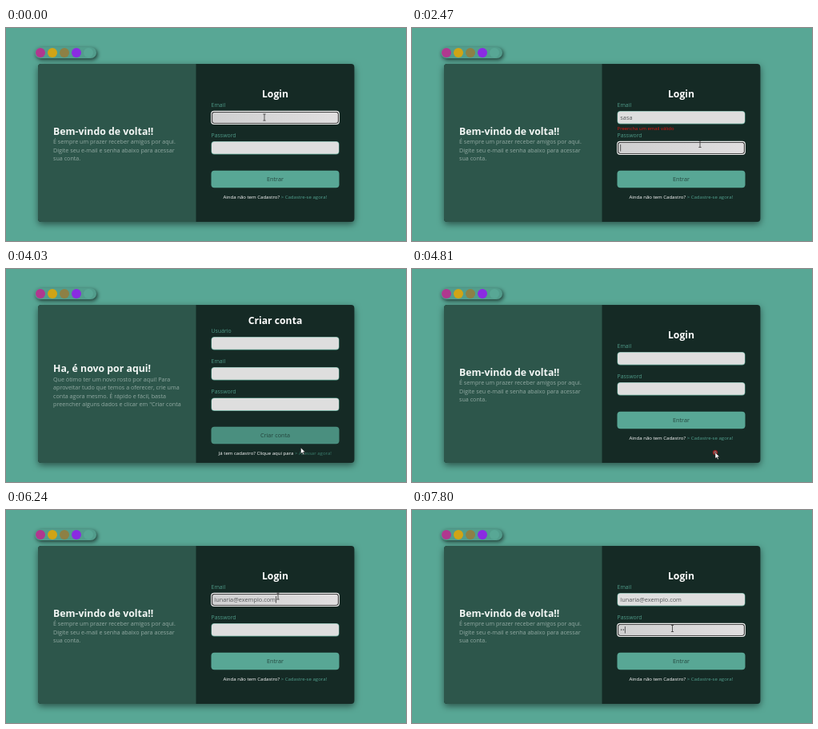
Animation of 500x267 px, one loop 8000 ms. Source, as an HTML page with a canvas:

```html
<!DOCTYPE html>
<html lang="pt-BR">
<head>
<meta charset="utf-8">
<title>Login</title>
<style>
html, body { margin: 0; width: 100%; height: 100%; overflow: hidden; background: #58a795; }
canvas { display: block; width: 500px; height: 267px; }
</style>
</head>
<body>
<canvas id="stage"></canvas>
<script>
const W = 500, H = 267, LOOP = 8000, STEP = 130, LAST = 60;
const GREEN = '#58a795', LEFT = '#2d564b', RIGHT = '#152a25', LABEL = '#4f9a88';
const FONT = '"Open Sans", "Noto Sans", sans-serif';
const MAIL = 'lunaria@exemplo.com';

const canvas = document.getElementById('stage');
const ctx = canvas.getContext('2d');
const dpr = window.devicePixelRatio || 1;
canvas.width = W * dpr;
canvas.height = H * dpr;

const clamp = v => Math.max(0, Math.min(1, v));
const ease = p => p * p * (3 - 2 * p);
const mix = (a, b, p) => a + (b - a) * p;

// Pointer stops: [arrival, x, y], with departure times between them
const moves = [
  { from: 0, to: 0, x: 323, y: 112 },
  { from: 620, to: 910, x: 378, y: 89 },
  { from: 1400, to: 1820, x: 360, y: 145.5 },
  { from: 2470, to: 2720, x: 370, y: 212 },
  { from: 3860, to: 4030, x: 368.5, y: 224 },
  { from: 4060, to: 4500, x: 379, y: 230 },
  { from: 5050, to: 5440, x: 340, y: 108 },
  { from: 6300, to: 6760, x: 325.5, y: 148.5 }
];
const clicks = [1110, 2060, 2680, 4790, 5430, 6840];

const PAGES = {
  login: {
    head: 'Login', headY: 87.4, title: 'Bem-vindo de volta!!', titleY: 134,
    lines: ['É sempre um prazer receber amigos por aqui.',
            'Digite seu e-mail e senha abaixo para acessar', 'sua conta.'],
    fields: [['Email', 104], ['Password', 142]],
    button: 'Entrar', buttonY: 178.8,
    ask: 'Ainda não tem Cadastro?', link: '> Cadastre-se agora!'
  },
  signup: {
    head: 'Criar conta', headY: 68.5, title: 'Ha, é novo por aqui!', titleY: 129.3,
    lines: ['Que ótimo ter um novo rosto por aqui! Para',
            'aproveitar tudo que temos a oferecer, crie uma',
            'conta agora mesmo. É rápido e fácil, basta',
            'preencher alguns dados e clicar em "Criar conta'],
    fields: [['Usuário', 85], ['Email', 123], ['Password', 161.4]],
    button: 'Criar conta', buttonY: 197.8,
    ask: 'Já tem cadastro? Clique aqui para', link: '> Acessar agora!'
  }
};

function text(str, x, y, size, color, weight = 400, align = 'left') {
  ctx.font = `${weight} ${size}px ${FONT}`;
  ctx.textAlign = align;
  ctx.fillStyle = color;
  ctx.fillText(str, x, y);
  return ctx.measureText(str).width;
}

function box(x, y, w, h, r, fill) {
  ctx.beginPath();
  ctx.roundRect(x, y, w, h, r);
  if (fill) {
    ctx.fillStyle = fill;
    ctx.fill();
  }
}

function disc(x, y, r, fill) {
  ctx.beginPath();
  ctx.arc(x, y, r, 0, 7);
  ctx.fillStyle = fill;
  ctx.fill();
}

function shadow(dx, dy, blur, alpha) {
  ctx.shadowOffsetX = dx * dpr;
  ctx.shadowOffsetY = dy * dpr;
  ctx.shadowBlur = blur * dpr;
  ctx.shadowColor = `rgba(0,0,0,${alpha})`;
}

function frame() {
  ctx.fillStyle = GREEN;
  ctx.fillRect(0, 0, W, H);

  ctx.save();
  shadow(1.5, 2, 5, .65);
  box(36, 24, 77, 14, 7, '#529d8c');
  ctx.restore();
  ['#b0388f', '#d0a416', '#8d8045', '#8a2be2', GREEN]
    .forEach((c, i) => disc(43 + 15 * i, 31, 6, c));

  ctx.save();
  shadow(0, 3, 8, .5);
  box(40, 45, 395.4, 198, 4, RIGHT);
  ctx.restore();
  box(40, 45, 197.5, 198, [4, 0, 0, 4], LEFT);
}

function field(label, y, value, focused, caret) {
  const x = 256.5, w = 160, h = 16.6;
  text(label, 256.6, y - 5, 6.9, LABEL);
  if (focused) {
    box(x - .4, y - .2, w + .8, h + .5, 4, '#f4f4f4');
    box(x + .7, y + .9, w - 1.4, h - 1.7, 3.2, '#141414');
    const g = ctx.createLinearGradient(x, y, x + w, y + h);
    g.addColorStop(0, '#cfcfd0');
    g.addColorStop(1, '#e1dfe0');
    box(x + 1.6, y + 1.8, w - 3.2, h - 3.5, 2.5, g);
  } else {
    box(x, y, w, h, 4, '#5aa693');
    box(x + .5, y + .6, w - 1, h - 1.4, 3.5, '#dedede');
  }
  const tw = text(value, 260.3, y + 10.9, 7.35, '#55585a');
  if (caret) {
    ctx.fillStyle = '#222';
    ctx.fillRect(260.4 + tw, y + 4, .7, 8.5);
  }
}

function drawPage(page, values, focus, caret, hover, linkHover) {
  frame();
  text(page.title, 59, page.titleY, 12.3, '#f3f7f5', 700);
  page.lines.forEach((s, i) => text(s, 59, page.titleY + 11.4 + 10.4 * i, 7.18, '#92aaa3'));
  text(page.head, 336.5, page.headY, 12.2, '#fff', 700, 'center');
  page.fields.forEach(([label, y], i) =>
    field(label, y, values[i] || '', focus === i, focus === i && caret));

  const c = [[88, 74], [167, 143], [149, 127]].map(([a, b]) => Math.round(mix(a, b, hover)));
  box(256.5, page.buttonY, 160, 21.4, 4, `rgb(${c})`);
  text(page.button, 336.5, page.buttonY + 13.2, 7.25, '#24443c', 400, 'center');

  ctx.font = `400 6.05px ${FONT}`;
  const full = ctx.measureText(page.ask + ' ' + page.link).width;
  const x = 336.3 - full / 2, y = page.buttonY + 35;
  const w = text(page.ask + ' ', x, y, 6.05, '#fff');
  text(page.link, x + w, y, 6.05, linkHover ? '#3b7e6e' : '#52a18f');
}

function pointer(t) {
  let { x, y } = moves[0];
  for (const m of moves) {
    if (t < m.from || !m.to) continue;
    const p = ease(clamp((t - m.from) / (m.to - m.from)));
    x = mix(x, m.x, p);
    y = mix(y, m.y, p);
  }
  return { x, y };
}

function ripple(x, y, age) {
  if (age < 0 || age > 330) return;
  const r = mix(2, 13, clamp(age / 180));
  const g = ctx.createRadialGradient(x, y, 0, x, y, r);
  g.addColorStop(0, 'rgba(190,150,150,.85)');
  g.addColorStop(.45, 'rgba(170,85,85,.85)');
  g.addColorStop(.85, 'rgba(165,28,30,.85)');
  g.addColorStop(1, 'rgba(130,20,22,.6)');
  ctx.globalAlpha = 1 - clamp((age - 210) / 120);
  disc(x, y, r, g);
  ctx.globalAlpha = 1;
}

function arrow(x, y) {
  const pts = [[0, 0], [0, 7.6], [1.8, 6], [3.1, 8.8], [4.3, 8.2], [3, 5.5], [5.5, 5.4]];
  ctx.beginPath();
  pts.forEach(([a, b]) => ctx.lineTo(x + a, y + b));
  ctx.closePath();
  ctx.fillStyle = '#fff';
  ctx.fill();
  ctx.strokeStyle = '#111';
  ctx.lineWidth = .5;
  ctx.stroke();
}

function beam(x, y) {
  ctx.beginPath();
  ctx.moveTo(x - 1.6, y - 4);
  ctx.lineTo(x + 1.6, y - 4);
  ctx.moveTo(x, y - 4);
  ctx.lineTo(x, y + 4);
  ctx.moveTo(x - 1.6, y + 4);
  ctx.lineTo(x + 1.6, y + 4);
  ctx.strokeStyle = '#333';
  ctx.lineWidth = .8;
  ctx.stroke();
}

function typed(str, t, start, gap) {
  return str.slice(0, Math.max(0, Math.floor((t - start) / gap) + 1));
}

function draw(t) {
  ctx.setTransform(dpr, 0, 0, dpr, 0, 0);
  const signup = t >= 2990 && t < 4810;
  const page = signup ? PAGES.signup : PAGES.login;
  const error = t >= 910 && t < 2990;

  let values = [], focus = -1, since = 0;
  if (t < 2990) {
    values = [typed('sasa', t, 260, 130)];
    if (t < 910) [focus, since] = [0, 130];
    else if (t >= 2080) [focus, since] = [1, 2080];
  } else if (!signup) {
    values = [typed(MAIL, t, 5600, 20), typed('••', t, 7410, 260)];
    if (t >= 6890) [focus, since] = [1, 7410];
    else if (t >= 5460) [focus, since] = [0, 5980];
  }
  const caret = t >= since && Math.floor((t - since) / 530) % 2 === 0;
  const hover = signup ? 1 - clamp((t - 4030) / 350) : 0;

  drawPage(page, values, focus, caret, hover, signup && t >= 4030);
  if (error) text('Preencha um email válido', 256.6, 127.8, 5.9, '#e3130f');

  const { x, y } = pointer(t);
  clicks.forEach(c => ripple(x, y, t - c));
  const inField = x > 256 && x < 417 && page.fields.some(f => y > f[1] && y < f[1] + 17);
  if (inField) beam(x, y);
  else arrow(x, y);
}

const begin = performance.now();
function tick() {
  const t = (performance.now() - begin) % LOOP;
  draw(Math.min(LAST, Math.floor(t / STEP)) * STEP);
  requestAnimationFrame(tick);
}
tick();
</script>
</body>
</html>
```
